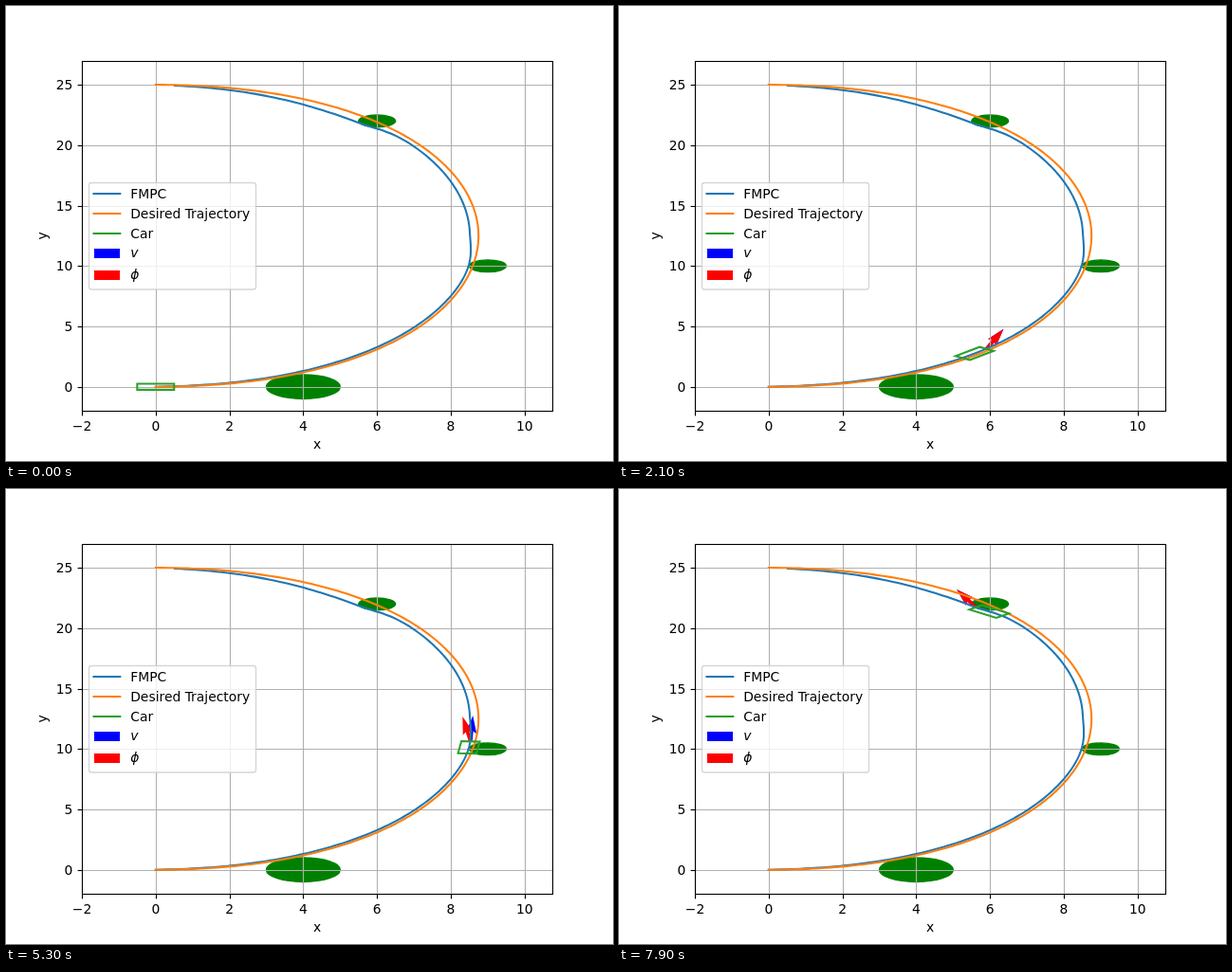
Animation of 640 by 480 pixels, one loop 8000 ms. Source, as an HTML page:

```html
<!DOCTYPE html>
<html lang="en">
<head>
<meta charset="utf-8">
<title>Car following a trajectory</title>
<style>
  html, body { margin: 0; width: 100%; height: 100%; overflow: hidden; background: #fff; }
  svg { display: block; width: 640px; height: 480px; }
  text { font: 13.89px "DejaVu Sans", sans-serif; fill: #000; }
  .italic { font-style: italic; }
  .line { fill: none; stroke-width: 2.08; stroke-linejoin: round; stroke-linecap: square; }
  .grid { stroke: #b0b0b0; stroke-width: 1.11; }
  .axis { fill: none; stroke: #000; stroke-width: 1.11; }
  .obstacle { fill: #008000; stroke: #008000; stroke-width: 1.39; }
</style>
</head>
<body>
<svg id="stage" viewBox="0 0 640 480" xmlns="http://www.w3.org/2000/svg"></svg>
<script>
const stage = document.getElementById("stage");
const BLUE = "#1f77b4", ORANGE = "#ff7f0e", GREEN = "#2ca02c";
const SX = 38.9, SY = 12.745;
const LOOP = 8000, STEP = 100;
const HELD = 0.433, RELEASE = 5.4, PATH_END = 0.985;

const px = x => 157.8 + SX * x;
const py = y => 401.7 - SY * y;
const snap = v => Math.floor(v + 0.5) + 0.5;

function add(tag, attrs, text) {
  const el = document.createElementNS("http://www.w3.org/2000/svg", tag);
  for (const key in attrs) el.setAttribute(key, attrs[key]);
  if (text) el.textContent = text;
  stage.appendChild(el);
  return el;
}
const line = (x1, y1, x2, y2, cls, stroke) =>
  add("line", { x1, y1, x2, y2, class: cls, ...(stroke && { stroke }) });
const label = (x, y, text, attrs) => add("text", { x, y, ...attrs }, text);

// Bell with a different width before and after its peak.
const swell = (s, peak, before, after) =>
  Math.exp(-(((s - peak) / (s < peak ? before : after) ) ** 2));

// Distance kept to the left of the desired curve, larger past each obstacle.
const gap = s => 3.2 * Math.max(0, Math.sin(Math.PI * s)) ** 0.8
  + 5.9 * swell(s, 0.51, 0.06, 0.2)
  + 5.2 * swell(s, 0.805, 0.04, 0.115);

function desired(s) {
  return [px(35 * s * (1 - s)), py(25 * s * s * (3 - 2 * s))];
}
function driven(s) {
  const [x, y] = desired(s);
  const dx = SX * 35 * (1 - 2 * s), dy = -SY * 150 * s * (1 - s);
  const k = gap(s) / Math.hypot(dx, dy);
  return [x + dy * k, y - dx * k];
}
function headingAt(s) {
  const [x1, y1] = driven(s - 0.003), [x2, y2] = driven(s + 0.003);
  return Math.atan2((y1 - y2) / SY, (x2 - x1) / SX);
}

// Speeds up gently, is held at the obstacle, then darts off and slows down.
function progress(sec) {
  const u = Math.max(0, sec - RELEASE);
  return Math.min(HELD, 0.09 * sec + 0.0025 * sec * sec) + 0.2255 * u - 0.035 * u * u;
}

function curve(point, end, stroke) {
  const n = 200;
  const points = Array.from({ length: n + 1 }, (_, i) =>
    point(end * i / n).map(v => v.toFixed(2)).join(","));
  add("polyline", { points: points.join(" "), class: "line", stroke });
}

const arrow = fill => add("path", {
  d: "M0-1.86H10.8L8.95-5.58L27.55 0L8.95 5.58L10.8 1.86H0Z", fill
});
function aim(el, x, y, angle) {
  el.setAttribute("transform", `translate(${x} ${y}) rotate(${-angle * 180 / Math.PI})`);
}

for (const [x, y, r] of [[4, 0, 1], [9, 10, 0.5], [6, 22, 0.5]])
  add("ellipse", { cx: px(x), cy: py(y), rx: r * SX, ry: r * SY, class: "obstacle" });

const speedArrow = arrow("#00f"), steerArrow = arrow("#f00");

for (let v = -2; v <= 10; v += 2) {
  const x = snap(px(v));
  line(x, 58, x, 427.5, "grid");
  line(x, 427.5, x, 432.4, "axis");
  label(px(v), 447.5, String(v).replace("-", "\u2212"), { "text-anchor": "middle" });
}
for (let v = 0; v <= 25; v += 5) {
  const y = snap(py(v));
  line(80, y, 576, y, "grid");
  line(75.6, y, 80.5, y, "axis");
  label(70.3, Math.round(py(v) + 5), String(v), { "text-anchor": "end" });
}

curve(driven, PATH_END, BLUE);
curve(desired, 1, ORANGE);
const car = add("polygon", { class: "line", stroke: GREEN, style: "stroke-linejoin:miter" });

add("rect", { x: 80.5, y: 58.5, width: 496, height: 369, class: "axis" });
label(328, 467, "x", { "text-anchor": "middle" });
label(0, 0, "y", { "text-anchor": "middle", transform: "translate(43 242.4) rotate(-90)" });

add("rect", {
  x: 87.5, y: 186.5, width: 176, height: 112.5, rx: 2.8,
  fill: "#fff", "fill-opacity": 0.8, stroke: "#ccc", "stroke-opacity": 0.8, "stroke-width": 1.39
});
[["FMPC", BLUE], ["Desired Trajectory", ORANGE], ["Car", GREEN]].forEach(([name, color], i) => {
  const base = Math.round(203.2 + 20.8 * i);
  line(92.5, base - 5, 120.3, base - 5, "line", color);
  label(131.2, base, name);
});
[["v", "#00f", 266], ["\u03d5", "#f00", 289]].forEach(([name, fill, base]) => {
  add("rect", { x: 93, y: base - 10, width: 27, height: 10, fill });
  label(131.2, base - 0.7, name, { class: "italic" });
});

function draw(t) {
  const step = Math.floor(t / STEP);
  const s = progress(step * STEP / 1000);
  const [x, y] = driven(s);
  const heading = step ? headingAt(s) : 0;
  const cos = Math.cos(heading), sin = Math.sin(heading);
  const place = (along, across) =>
    [x + SX * (along * cos - across * sin), y - SY * (along * sin + across * cos)];
  car.setAttribute("points", [
    place(-0.5, -0.25), place(0.5, -0.25), place(0.5, 0.25), place(-0.5, 0.25)
  ].join(" "));

  // While held up by the obstacle the car rocks back and forth.
  const rocking = step > 44 && step < 55;
  const reverse = rocking && step % 2 === 0;
  const steer = !rocking ? 0 : reverse ? -0.5 : 0.4;
  const [nx, ny] = place(0.5, 0);
  aim(speedArrow, nx, ny, heading + (reverse ? Math.PI : 0));
  aim(steerArrow, nx, ny, heading + steer);
  for (const el of [speedArrow, steerArrow])
    el.setAttribute("visibility", step > 0 ? "visible" : "hidden");
}

const start = performance.now();
function tick() {
  draw((performance.now() - start) % LOOP);
  requestAnimationFrame(tick);
}
tick();
</script>
</body>
</html>
```
